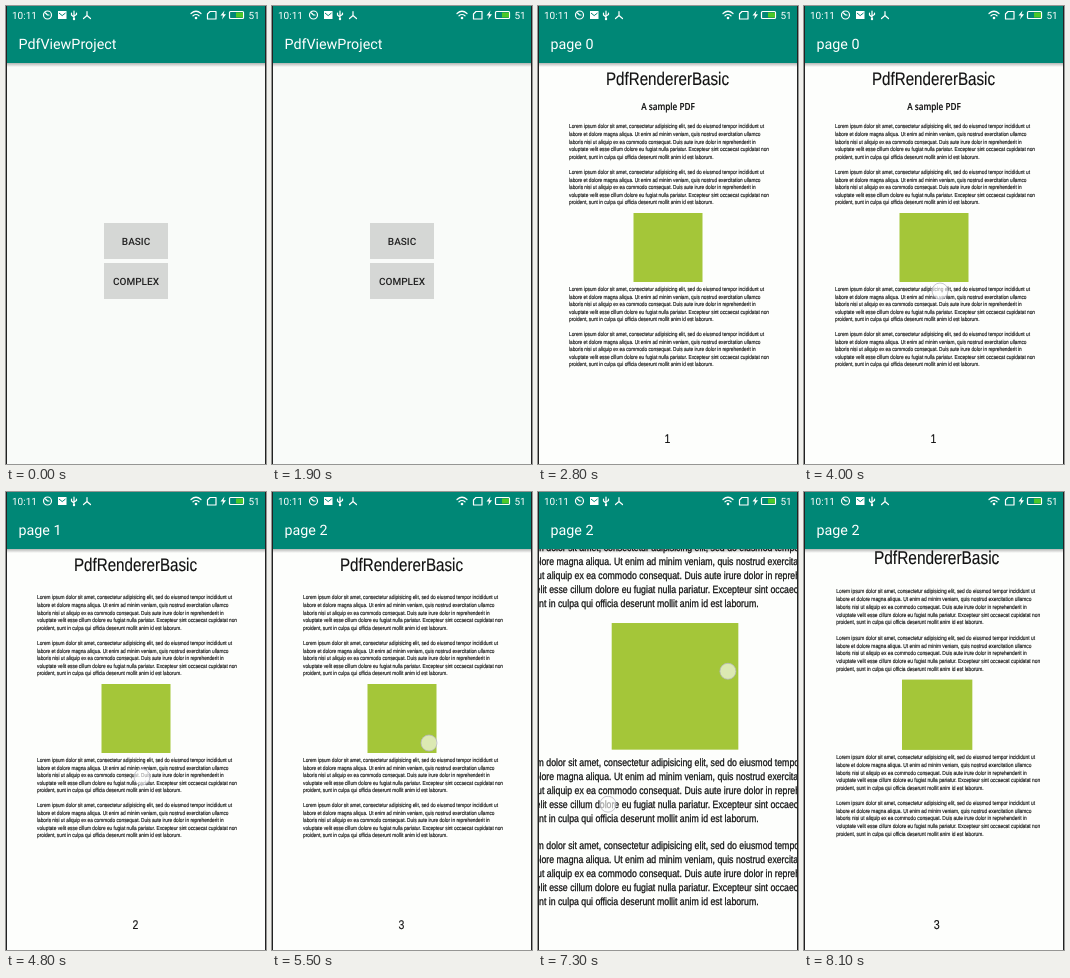
Animation of 260x458 px, one loop 8200 ms. Source, as an HTML page:

```html
<!DOCTYPE html>
<html lang="en">
<head>
<meta charset="utf-8">
<title>Page viewer</title>
<style>
html, body { margin: 0; width: 100%; height: 100%; overflow: hidden; background: #fff; }
svg { display: block; width: 100vw; height: 100vh; }
text { font-family: Roboto, sans-serif; text-rendering: geometricPrecision; }
.page text { font-family: "Liberation Sans", Arial, sans-serif; fill: #111; stroke: #111; stroke-width: .12; }
.page .sub { font-family: "Open Sans", sans-serif; font-weight: 600; }
.mid { text-anchor: middle; }
.btn { font-size: 10px; font-weight: 500; fill: #222; }
.line { fill: none; stroke: #fff; stroke-width: 1.2; stroke-linecap: round; stroke-linejoin: round; }
.dot { fill: #fff; fill-opacity: .62; stroke: #b4b4c0; stroke-opacity: .75; }
</style>
</head>
<body>
<svg viewBox="0 0 260 458" preserveAspectRatio="none">
  <defs>
    <linearGradient id="shade" x2="0" y2="1">
      <stop stop-color="#000" stop-opacity=".28"/>
      <stop offset="1" stop-color="#000" stop-opacity="0"/>
    </linearGradient>
  </defs>

  <rect width="260" height="458" fill="#fdfefc"/>
  <g id="home">
    <rect width="260" height="458" fill="#f9fbf9"/>
    <rect x="98" y="217" width="64" height="36" fill="#d5d7d5"/>
    <rect x="98" y="257" width="64" height="36" fill="#d5d7d5"/>
    <text class="btn mid" x="130" y="238.5">BASIC</text>
    <text class="btn mid" x="130" y="278.5">COMPLEX</text>
  </g>
  <g id="pages"></g>

  <rect width="260" height="57" fill="#008776"/>
  <rect y="57" width="260" height="4" fill="url(#shade)"/>
  <text id="title" x="12.5" y="43.2" font-size="14.3" fill="#fff"></text>
  <rect id="dim" width="260" height="458"/>

  <g id="dialog">
    <rect x="18" y="215" width="223" height="46" rx="1.5" fill="#f4f4f4"/>
    <circle cx="58" cy="238" r="14" fill="none" stroke="#2f9fc4" stroke-width="3" stroke-dasharray="68 20"/>
    <text x="82" y="241.5" font-size="9.8" fill="#555" style="font-family:'Noto Sans CJK SC','Noto Sans CJK',sans-serif">正在加载第9页/10页</text>
  </g>

  <g id="status">
    <text x="6" y="12.7" font-size="10" fill="#fff">10:11</text>
    <circle class="line" cx="41.5" cy="9" r="4"/>
    <path class="line" d="M39.5 7l2 2h1.5"/>
    <rect x="52" y="5" width="8.5" height="8" fill="#fff"/>
    <path d="M53 7l3.2 2.6L59.5 7" fill="none" stroke="#008776"/>
    <path class="line" d="M68 5v8M65.5 7v2l2.5 2M70.5 7v1.5L68 10"/>
    <circle cx="68" cy="13" r="1.2" fill="#fff"/>
    <path class="line" d="M81 5.5v4l-3.5 3M81 9.5l3.5 3"/>
    <path class="line" d="M185 7.5q5-4.5 10 0M187 9.8q3-2.6 6 0"/>
    <circle cx="190" cy="12" r="1.3" fill="#fff"/>
    <path class="line" d="M204 5.5h6v7.5h-8.5v-5z"/>
    <path d="M218.500 4.500l-4 5h2.500l-1 4 4-5.200h-2.500z" fill="#fff"/>
    <rect class="line" x="223.5" y="5.5" width="14" height="7" rx="1"/>
    <rect x="230" y="6.5" width="7" height="5" fill="#4cc828"/>
    <text x="242.5" y="12.7" font-size="10" fill="#fff">51</text>
  </g>
  <g id="dots"></g>
  <path d="M.5 0v458M259.5 0v458" stroke="#222"/>
</svg>

<script>
const LOOP = 8200, STEP = 100, WIDTH = 260;
const STRETCH = 1.2; // pages are fitted to the taller screen
const OPEN = 2100, NUDGE = 3200, SWIPES = [4000, 4800], DRAG = 300, SETTLE = 600;
const PRESS = 5500, PINCH = 6200, RELEASE = 7900;
const $ = id => document.getElementById(id);

const lorem = [
  'Lorem ipsum dolor sit amet, consectetur adipisicing elit, sed do eiusmod tempor incididunt ut',
  'labore et dolore magna aliqua. Ut enim ad minim veniam, quis nostrud exercitation ullamco',
  'laboris nisi ut aliquip ex ea commodo consequat. Duis aute irure dolor in reprehenderit in',
  'voluptate velit esse cillum dolore eu fugiat nulla pariatur. Excepteur sint occaecat cupidatat non',
  'proident, sunt in culpa qui officia deserunt mollit anim id est laborum.'
];

const label = (x, y, size, str, cls = '') =>
  `<text class="${cls}" x="${x}" y="${y / STRETCH}" font-size="${size}">${str}</text>`;

const paragraph = top =>
  lorem.map((str, i) => label(31, top + i * 7.6, 4.77, str)).join('');

function page(n) {
  const up = n ? 15 : 0;
  return `<g class="page" transform="translate(${n * WIDTH} 0)">
    <g transform="scale(1 ${STRETCH})">
      ${label(129.5, 79, 15.16, 'PdfRendererBasic', 'mid')}
      ${n ? '' : label(130, 104.5, 8.2, 'A sample PDF', 'mid sub')}
      ${[122.5, 168, 285, 330].map(y => paragraph(y - up)).join('')}
      ${label(129.5, 436.5, 10.5, n + 1, 'mid')}
    </g>
    <rect x="95.5" y="${207 - up}" width="69" height="69" fill="#a4c639"/>
  </g>`;
}
$('pages').innerHTML = [0, 1, 2].map(page).join('');

// Smooth 0 to 1 between two times.
function ease(t, from, to) {
  const k = Math.min(1, Math.max(0, (t - from) / (to - from)));
  return k * k * (3 - 2 * k);
}
const rise = (t, a, b, c, d) => ease(t, a, b) * (1 - ease(t, c, d));
const within = (t, from, length) => t >= from && t <= from + length;

function draw(t) {
  const opened = t >= OPEN;
  const turned = SWIPES.filter(s => t >= s + DRAG).length;
  $('home').style.display = opened ? 'none' : '';
  $('pages').style.display = opened ? '' : 'none';
  $('title').textContent = opened ? 'page ' + turned : 'PdfViewProject';
  $('dim').setAttribute('opacity', .4 * rise(t, OPEN, 2300, 2400, 2600));
  $('dialog').setAttribute('opacity', .9 * rise(t, OPEN, 2300, 2200, 2540));

  const nudge = -48 * rise(t, NUDGE, NUDGE + DRAG, NUDGE + DRAG, NUDGE + SETTLE);
  const moves = SWIPES.map(s => -WIDTH * ease(t, s, s + SETTLE));
  const left = moves.reduce((a, b) => a + b, nudge);

  // Pinch around a fixed point, with a slight drift while closing.
  const pinch = rise(t, PINCH, 7000, 7000, LOOP);
  const scale = 1 + .99 * pinch, drift = 3 * ease(t, 7300, 8100);
  const x = 121.6 * (1 - scale) + drift, y = 265 * (1 - scale) - drift;
  $('pages').setAttribute('transform', `translate(${x} ${y}) scale(${scale}) translate(${left} 0)`);

  const dots = [];
  if (t === OPEN - STEP) dots.push([130, 236]);
  if (within(t, NUDGE, DRAG)) dots.push([136 + nudge, 285]);
  SWIPES.forEach((s, i) => {
    if (within(t, s, DRAG)) dots.push([136 + moves[i], 285]);
  });
  if (within(t, PRESS, RELEASE - PRESS)) dots.push([157 + 39 * pinch, 251 - 85 * pinch]);
  if (within(t, PINCH, RELEASE - PINCH)) dots.push([105 - 41.5 * pinch, 270 + 50 * pinch]);
  $('dots').innerHTML = dots.map(([cx, cy]) =>
    `<circle class="dot" cx="${cx}" cy="${cy}" r="8"/>`).join('');
}

let last = -1;
const start = performance.now();
function tick() {
  const t = Math.floor((performance.now() - start) % LOOP / STEP) * STEP;
  if (t !== last) draw(last = t);
  requestAnimationFrame(tick);
}
tick();
</script>
</body>
</html>
```
